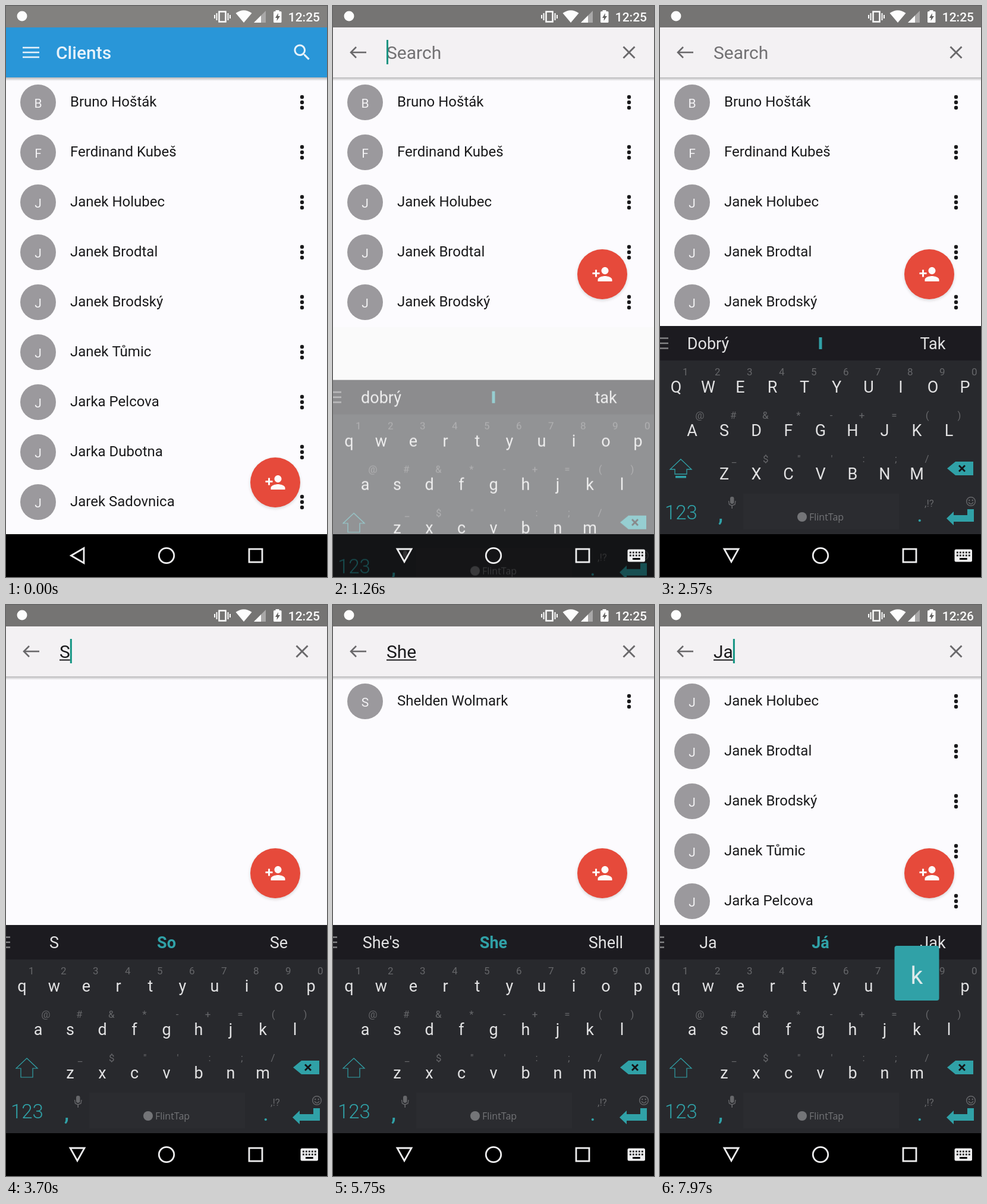
An HTML page with a canvas for the animation above (8 s loop, 540x960 px).

```html
<!DOCTYPE html>
<html lang="en">
<head>
<meta charset="utf-8">
<title>Client search</title>
<style>
html, body { margin: 0; width: 100%; height: 100%; overflow: hidden; background: #000; }
canvas { display: block; width: 540px; height: 960px; }
</style>
</head>
<body>
<canvas id="stage" width="540" height="960"></canvas>
<script>
const stage = document.getElementById('stage').getContext('2d');
const layer = new OffscreenCanvas(540, 960).getContext('2d');
let ctx = stage;
const LOOP = 8000, RESIZE = 1040;
const TEAL = '#30a1a7', INK = '#1a1a1c', KEY = '#e2e2e3', HINT = '#66676a', NAV = '#efeff0', GREY = '#69686a';

const people = ['Bruno Hošták', 'Ferdinand Kubeš', 'Janek Holubec', 'Janek Brodtal', 'Janek Brodský',
  'Janek Tůmic', 'Jarka Pelcova', 'Jarka Dubotna', 'Jarek Sadovnica', 'Shelden Wolmark'];
const startsWith = s => people.filter(p => p.startsWith(s));

// Timelines: [start, value]
const inputs = [[0, ''], [3530, 'S'], [3870, 'Sh'], [4220, 'She'], [6330, ''], [7570, 'J'], [7810, 'Ja']];
const lists = [[0, people], [3530, startsWith('S')], [6330, people], [7620, startsWith('Ja')]];
const words = [[0, ['dobrý', '', 'tak']], [1520, ['Dobrý', '', 'Tak']], [3620, ['S', 'So', 'Se']],
  [3930, ['Sh', 'She', 'Should']], [4270, ["She's", 'She', 'Shell']], [6330, ['Dobrý', '', 'Tak']],
  [7640, ['J', 'Já', 'Je']], [7880, ['Ja', 'Já', 'Jak']]];
const blinks = [1040, 1540, 2050, 2570, 3050, 4740, 5220, 5750, 6330, 6880, 7380];
const presses = [['s', 3440, 3590], ['h', 3780, 3930], ['e', 4140, 4310],
  ['j', 7420, 7640], ['a', 7680, 7850], ['k', 7960, 8100]];
const rows = [
  { keys: 'qwertyuiop', hints: '1234567890', x: 27, y: 650 },
  { keys: 'asdfghjkl', hints: '@#&*-+=()', x: 54, y: 723 },
  { keys: 'zxcvbnm', hints: '_$"\':;/', x: 108, y: 796 }
];

const icons = {
  search: new Path2D('M15.5 14h-.79l-.28-.27C15.41 12.59 16 11.11 16 9.5 16 5.91 13.09 3 9.5 3S3 5.91 3 9.5 5.91 16 9.5 16c1.61 0 3.09-.59 4.23-1.57l.27.28v.79l5 4.99L20.49 19l-4.99-5zm-6 0C7.01 14 5 11.99 5 9.5S7.01 5 9.5 5 14 7.01 14 9.5 11.99 14 9.5 14z'),
  addPerson: new Path2D('M15 12c2.21 0 4-1.79 4-4s-1.79-4-4-4-4 1.79-4 4 1.79 4 4 4zm-9-2V7H4v3H1v2h3v3h2v-3h3v-2H6zm9 4c-2.67 0-8 1.34-8 4v2h16v-2c0-2.66-5.33-4-8-4z')
};

const clamp = v => Math.max(0, Math.min(1, v));
const span = (t, from, len) => clamp((t - from) / len);
const ease = p => (1 - Math.cos(Math.PI * p)) / 2;
const indexAt = (line, t) => line.filter(e => e[0] <= t).length - 1;
const at = (line, t) => line[indexAt(line, t)][1];
const isUpper = t => (t >= 1520 && t < 3620) || (t >= 7230 && t < 7640);

function rect(x, y, w, h, color) {
  ctx.fillStyle = color;
  ctx.fillRect(x, y, w, h);
}
function round(x, y, w, h, r, color) {
  ctx.fillStyle = color;
  ctx.beginPath();
  ctx.roundRect(x, y, w, h, r);
  ctx.fill();
}
function disc(x, y, r, color) {
  ctx.fillStyle = color;
  ctx.beginPath();
  ctx.arc(x, y, r, 0, 7);
  ctx.fill();
}
function ring(x, y, r, color, width) {
  ctx.strokeStyle = color;
  ctx.lineWidth = width;
  ctx.beginPath();
  ctx.arc(x, y, r, 0, 7);
  ctx.stroke();
}
function trace(points, close) {
  ctx.beginPath();
  for (let i = 0; i < points.length; i += 2) ctx.lineTo(points[i], points[i + 1]);
  if (close) ctx.closePath();
}
function poly(points, color) {
  trace(points, true);
  ctx.fillStyle = color;
  ctx.fill();
}
function line(points, color, width, close) {
  trace(points, close);
  ctx.strokeStyle = color;
  ctx.lineWidth = width;
  ctx.stroke();
}
function text(s, x, y, size, color, align = 'left', weight = 400) {
  ctx.font = `${weight} ${size}px Roboto, sans-serif`;
  ctx.textAlign = align;
  ctx.fillStyle = color;
  ctx.fillText(s, x, y);
}
function icon(path, x, y, color) {
  ctx.save();
  ctx.translate(x, y);
  ctx.scale(1.5, 1.5);
  ctx.fillStyle = color;
  ctx.fill(path);
  ctx.restore();
}
function clipTo(x, y, w, h) {
  ctx.beginPath();
  ctx.rect(x, y, w, h);
  ctx.clip();
}

function statusBar(t) {
  const white = '#fdfdfd';
  rect(0, 0, 540, 36, t < 610 ? '#82817f' : '#757473');
  disc(27, 17, 8.5, white);
  ctx.strokeStyle = white;
  ctx.lineWidth = 2.5;
  ctx.strokeRect(358.5, 9.5, 11, 17);
  line([354.5, 12, 354.5, 24], white, 2);
  line([351, 15, 351, 21], white, 2);
  line([373.5, 12, 373.5, 24], white, 2);
  line([377, 15, 377, 21], white, 2);
  ctx.fillStyle = white;
  ctx.beginPath();
  ctx.moveTo(400, 28);
  ctx.lineTo(386.5, 12);
  ctx.quadraticCurveTo(400, 2.5, 413.5, 12);
  ctx.fill();
  poly([417, 28, 437, 8, 437, 28], '#a9a8a8');
  poly([417, 28, 429, 16, 429, 28], white);
  rect(453.5, 7, 6, 3, white);
  round(450, 9, 13.5, 19, 1.5, white);
  poly([458, 12, 453, 20, 456, 20, 455.5, 25, 461, 17, 457.5, 17], '#626160');
  text(t < 6970 ? '12:25' : '12:26', 528, 26, 21, white, 'right', 500);
}

function person(name, y, tone) {
  disc(54, y, 30, tone);
  text(name[0], 54, y + 8.5, 21, '#f4f3f5', 'center');
  text(name, 108, y + 7, 24, INK);
  for (const d of [-9, 0, 9]) disc(498, y + d, 3.2, INK);
}

function clientList(t) {
  const bottom = t < RESIZE ? 888 : 538;
  rect(0, 120, 540, 768, '#fcfbfe');
  if (t >= RESIZE) rect(0, 540, 540, 348, '#fafafa');
  const n = indexAt(lists, t), [start, now] = lists[n];
  const before = n ? lists[n - 1][1] : now;
  const removed = before.some(p => !now.includes(p));
  const moveAt = start + (removed ? 120 : 0);
  const move = n ? ease(span(t, moveAt, 230)) : 1;
  const tone = '#9b999d';
  const rowY = i => 162 + 84 * i;
  ctx.save();
  clipTo(0, 120, 540, bottom - 120);
  before.forEach((p, i) => {
    if (now.includes(p)) return;
    ctx.globalAlpha = 1 - span(t, start, 120);
    person(p, rowY(i), tone);
  });
  now.forEach((p, i) => {
    const old = before.indexOf(p);
    ctx.globalAlpha = old < 0 ? span(t, moveAt + 240, 120) : 1;
    person(p, old < 0 ? rowY(i) : rowY(old) + (rowY(i) - rowY(old)) * move, tone);
  });
  ctx.restore();
}

function addButton(y) {
  ctx.save();
  ctx.shadowColor = 'rgba(60,60,60,.2)';
  ctx.shadowBlur = 5;
  ctx.shadowOffsetY = 2;
  disc(453, y, 42, '#e64a3b');
  ctx.restore();
  icon(icons.addPerson, 435, y - 18, '#fdfbfb');
}

function toolbar() {
  const pale = '#e6f2fa';
  rect(0, 36, 540, 84, '#2996d8');
  for (const y of [70, 78, 86]) line([28, y, 56, y], pale, 2.6);
  text('Clients', 84, 89, 30, pale, 'left', 500);
  icon(icons.search, 480, 60, pale);
}

function searchBar(t) {
  const value = at(inputs, t);
  ctx.save();
  clipTo(0, 36, 540, 84);
  const reveal = span(t, 590, 240);
  if (reveal < 1) {
    ctx.beginPath();
    ctx.arc(504, 72, 540 * ease(reveal), 0, 7);
    ctx.clip();
  }
  rect(0, 36, 540, 84, '#f3f1f3');
  const press = span(t, 5830, 220), fade = 1 - span(t, 6230, 250);
  if (press > 0 && fade > 0) disc(498, 78, 12 + 28 * press, `rgba(70,70,70,${0.18 * fade})`);
  line([56, 78, 30, 78], GREY, 2.6);
  line([39, 69, 30, 78, 39, 87], GREY, 2.6);
  line([488.5, 68.5, 507.5, 87.5], GREY, 2.8);
  line([507.5, 68.5, 488.5, 87.5], GREY, 2.8);
  text(value || 'Search', 90, 89, 30, value ? INK : '#727173');
  const w = value ? ctx.measureText(value).width : 0;
  if (value) rect(90, 91.5, w, 2, INK);
  if (blinks.filter(b => b <= t).length % 2) rect(90 + w, 57, 3, 41, '#129482');
  ctx.restore();
}

function barShadow() {
  const g = ctx.createLinearGradient(0, 120, 0, 126);
  g.addColorStop(0, 'rgba(90,90,90,.42)');
  g.addColorStop(1, 'rgba(90,90,90,0)');
  rect(0, 120, 540, 6, g);
}

function suggestions(t) {
  const [left, mid, right] = at(words, t);
  rect(0, 538, 540, 58, '#1c1b20');
  const w = t < 3440 ? 14 : 7;
  for (const y of [558.5, 567, 575.5]) rect(0, y - 1.2, w, 2.4, '#858587');
  text(left, 81, 577, 27, KEY, 'center');
  text(right, 459, 577, 27, KEY, 'center');
  if (mid) text(mid, 270, 577, 27, TEAL, 'center', 700);
  else rect(267.5, 557, 5, 20, TEAL);
}

function bottomKeys(upper) {
  if (upper) {
    line([35, 762, 53, 779, 45, 779, 45, 787, 25, 787, 25, 779, 17, 779], TEAL, 1.3, true);
    rect(26, 790, 18, 3.5, TEAL);
  } else {
    line([35, 762, 53, 779, 45, 779, 45, 794, 25, 794, 25, 779, 17, 779], TEAL, 1.2, true);
  }
  poly([483, 777.5, 497, 766, 527, 766, 527, 789, 497, 789], TEAL);
  line([503, 772.5, 513, 782.5], '#141417', 2.8);
  line([513, 772.5, 503, 782.5], '#141417', 2.8);
  text('123', 8, 863, 33, TEAL, 'left', 300);
  text(',', 102, 866, 36, TEAL, 'center', 500);
  text('.', 437, 867, 30, TEAL, 'center', 500);
  poly([482, 861.5, 494, 850, 494, 856, 517, 856, 517, 846, 528, 846, 528, 867, 494, 867, 494, 873], TEAL);
  // microphone
  round(118, 825, 6.5, 12, 3, HINT);
  line([115.5, 832, 116.5, 838, 121, 840, 126, 838, 127, 832], HINT, 1.4);
  line([121.2, 840, 121.2, 845], HINT, 1.6);
  text(',!?', 453, 842, 17, HINT, 'center');
  // smiley
  ring(523, 833, 7.3, HINT, 1.4);
  disc(520.3, 831, 1.2, HINT);
  disc(525.7, 831, 1.2, HINT);
  ctx.beginPath();
  ctx.arc(523, 833, 4, 0.3, 2.84);
  ctx.stroke();
  disc(239, 859, 8, '#747578');
  ctx.font = '500 16px "Open Sans", sans-serif';
  ctx.textAlign = 'left';
  ctx.fillStyle = '#747578';
  ctx.fillText('FlintTap', 251, 865);
}

function keyboard(t) {
  const upper = isUpper(t);
  const show = c => upper ? c.toUpperCase() : c;
  rect(0, 538, 540, 350, '#28292d');
  suggestions(t);
  rect(140, 820, 262, 60, '#2b2c30');
  const press = presses.find(p => t >= p[1] && t < p[2]);
  let popup;
  for (const row of rows) {
    [...row.keys].forEach((c, i) => {
      const x = row.x + 54 * i;
      if (press && press[0] === c) {
        popup = [x, row.y - 150, show(c)];
        if (t - press[1] > 20) round(x - 23, row.y - 51, 46, 66, 3, '#19191d');
      }
      text(row.hints[i], x + 20.5, row.y - 29, 17, HINT, 'right');
      text(show(c), x, row.y, 27, KEY, 'center');
    });
  }
  bottomKeys(upper);
  if (popup) {
    const [x, y, c] = popup;
    round(x - 37.5, y, 75, 92, 4, TEAL);
    text(c, x, y + 64, 41, '#dceaea', 'center');
  }
}

// The keyboard fades as one flat picture
function slidingKeyboard(t) {
  const p = span(t, RESIZE, 450);
  ctx = layer;
  ctx.clearRect(0, 0, 540, 960);
  keyboard(t);
  ctx = stage;
  ctx.globalAlpha = p;
  ctx.drawImage(layer.canvas, 0, 350 * (1 - p) ** 2);
  ctx.globalAlpha = 1;
}

function navBar(t) {
  const typing = t >= RESIZE;
  line(typing ? [108, 913, 132, 913, 120, 934.5] : [109.5, 924, 131, 911.5, 131, 936.5], NAV, 2.8, true);
  ring(270, 924, 12.7, NAV, 2.8);
  ctx.strokeStyle = NAV;
  ctx.strokeRect(409, 913, 22, 22);
  if (!typing) return;
  round(495.5, 913.5, 29.5, 21, 2.5, NAV);
  for (let r = 0; r < 2; r++)
    for (let c = 0; c < 5; c++) rect(499 + c * 5, 917.5 + r * 5, 2.7, 2.7, '#000');
  rect(504, 928, 12.7, 3, '#000');
}

function draw(t) {
  clientList(t);
  addButton(t < RESIZE ? 801 : 451);
  statusBar(t);
  toolbar();
  if (t >= 610) searchBar(t);
  barShadow();
  rect(0, 888, 540, 72, '#000');
  if (t >= RESIZE) slidingKeyboard(t);
  navBar(t);
}

const begin = performance.now();
function frame() {
  draw((performance.now() - begin) % LOOP);
  requestAnimationFrame(frame);
}
frame();
</script>
</body>
</html>
```
